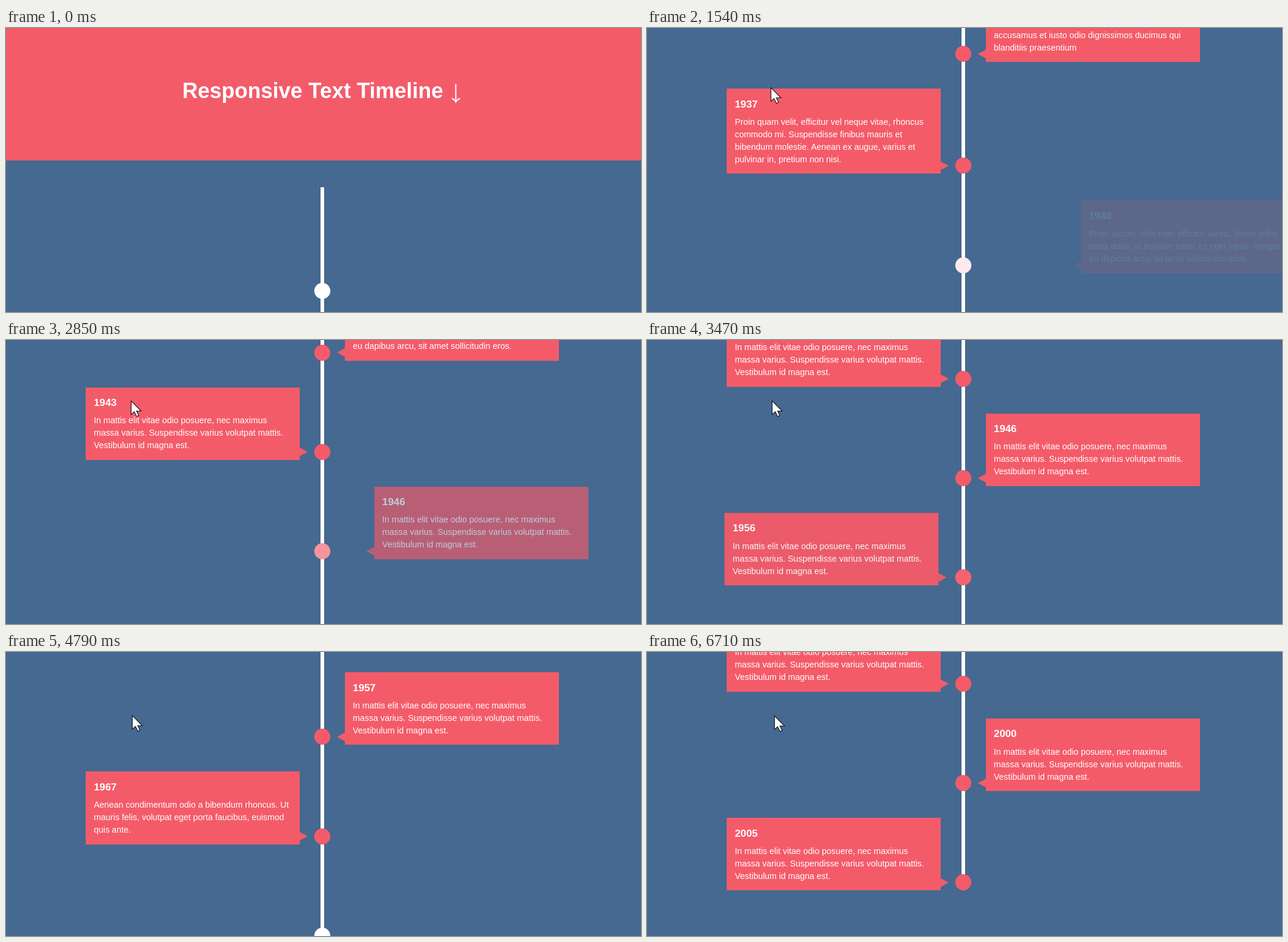
Write an HTML page that moves like this. It is 1068 px wide and 478 px high and loops after 7.09 s.

```html
<!DOCTYPE html>
<html lang="en">
<head>
<meta charset="utf-8">
<title>Responsive Text Timeline</title>
<style>
  html, body { margin: 0; width: 100%; height: 100%; overflow: hidden; background: #456990; }
  svg { display: block; width: 1068px; height: 478px; }
  text { font: 14.4px Arial, "Liberation Sans", sans-serif; fill: #fff; white-space: pre; }
  .year { font-size: 17.28px; font-weight: bold; }
  .heading { font-size: 36px; font-weight: bold; }
</style>
</head>
<body>
<svg viewBox="0 0 1068 478">
  <rect width="1068" height="478" fill="#456990"/>
  <g id="page">
    <rect width="1068" height="223" fill="#f45b69"/>
    <text class="heading" x="296.5" y="118">Responsive Text Timeline</text>
    <path d="M756.5 94V124.5M750 118.5Q754.5 120.5 756.5 124.5Q758.5 120.5 763.5 118.5" fill="none" stroke="#fff" stroke-width="2"/>
    <rect id="line" x="529" y="268" width="6" fill="#fff"/>
  </g>
  <g id="cursor">
    <path id="arrow" d="M.5 .5V23.5L5.7 18.6L9.7 26.8L13.3 25.2L9.6 17.5H17.3Z" fill="#fff" stroke="#111" stroke-width="1.1"/>
    <path id="beam" d="M-6-12H-1M2-12H7M-6 11H-1M2 11H7M.5-11V10" fill="none" stroke="#c49a6c" stroke-width="2"/>
  </g>
</svg>
<script>
const LOOP = 7090, STEP = 77.1;
const SLIDE = 500, PAINT_LAG = 30;

const mattis = ['In mattis elit vitae odio posuere, nec maximus',
  'massa varius. Suspendisse varius volutpat mattis.', 'Vestibulum id magna est.'];

// year, time at which the card starts to slide in, lines
const entries = [
  [1934, 50, ['Lorem ipsum dolor sit amet, consectetur', 'adipiscing elit sed diam. At vero eos et',
    'accusamus et iusto odio dignissimos ducimus qui', 'blanditiis praesentium']],
  [1937, 665, ['Proin quam velit, efficitur vel neque vitae, rhoncus', 'commodo mi. Suspendisse finibus mauris et',
    'bibendum molestie. Aenean ex augue, varius et', 'pulvinar in, pretium non nisi.']],
  [1940, 1387, ['Proin iaculis, nibh eget efficitur varius, libero tellus',
    'porta dolor, at pulvinar tortor ex eget ligula. Integer', 'eu dapibus arcu, sit amet sollicitudin eros.']],
  [1943, 1723, mattis],
  [1946, 2525, mattis],
  [1956, 3018, mattis],
  [1957, 3765, mattis],
  [1967, 4015, ['Aenean condimentum odio a bibendum rhoncus. Ut',
    'mauris felis, volutpat eget porta faucibus, euismod', 'quis ante.']],
  [1977, 4795, ['Vestibulum porttitor lorem sed pharetra dignissim.',
    'Nulla maximus, dui a tristique iaculis, quam dolor', 'convallis enim, non dignissim ligula ipsum a turpis.']],
  [1985, 5190, mattis],
  [2000, 5486, mattis],
  [2005, 6185, mattis]
];

// wheel ticks: start, end, scroll position reached
const ticks = [
  [30, 230, 100], [580, 790, 200], [1325, 1555, 400], [1580, 1760, 500],
  [2162, 2362, 600], [2405, 2605, 700], [2720, 2920, 800], [2934, 3134, 900],
  [3560, 3740, 1000], [3740, 3893, 1100], [3893, 4093, 1200], [4100, 4300, 1300],
  [4711, 4911, 1400], [4930, 5110, 1500], [5150, 5330, 1600], [5367, 5567, 1700],
  [6040, 6290, 1915]
];

// pointer moves: time, x, y
const moves = [[0, 208, 100], [1700, 210, 102], [4000, 212, 106.5], [6020, 214, 107]];
const beamTimes = [[1700, 2380], [5060, 5260]];

const $ = id => document.getElementById(id);
const clamp = x => Math.min(1, Math.max(0, x));

function add(parent, tag, attrs, text) {
  const node = document.createElementNS('http://www.w3.org/2000/svg', tag);
  for (const key in attrs) node.setAttribute(key, attrs[key]);
  if (text !== undefined) node.textContent = text;
  return parent.appendChild(node);
}

// cubic-bezier(.42, 0, .58, 1)
function easeInOut(x) {
  let lo = 0, hi = 1, u = x;
  for (let i = 0; i < 24; i++) {
    u = (lo + hi) / 2;
    const at = 1.26 * u * (1 - u) ** 2 + 1.74 * u * u * (1 - u) + u ** 3;
    if (at < x) lo = u; else hi = u;
  }
  return x <= 0 ? 0 : x >= 1 ? 1 : u * u * (3 - 2 * u);
}

const easeQuad = x => x < .5 ? 2 * x * x : 1 - 2 * (1 - x) ** 2;

function scrollAt(t) {
  let pos = 0;
  for (const [start, end, target] of ticks) {
    if (t <= start) break;
    pos += (target - pos) * easeQuad(clamp((t - start) / (end - start)));
  }
  return Math.round(pos);
}

let y = 268;
const items = entries.map(([year, start, lines], i) => {
  const right = i % 2 === 0;
  const top = y + 45, bottom = top + 59.2 + 21 * lines.length;
  const boxTop = Math.round(top), boxBottom = Math.round(bottom);
  const x = right ? 570 : 134, textX = right ? 583.3 : 147.7;
  const baseline = offset => Math.floor(top - .05 + offset);
  const card = add($('page'), 'g', {});
  add(card, 'rect', { x, y: boxTop, width: 360, height: boxBottom - boxTop, fill: '#f45b69' });
  const [base, tip] = right ? [570, 556.5] : [494, 507.5];
  add(card, 'path', { d: `M${base} ${bottom - 20.7}L${tip} ${bottom - 13.5}L${base} ${bottom - 6.3}Z`, fill: '#f45b69' });
  add(card, 'text', { class: 'year', x: textX, y: baseline(32) }, year);
  lines.forEach((line, n) => add(card, 'text', { x: textX, y: baseline(61.2) + 21 * n }, line));
  y = bottom;
  return { start, card, side: right ? 1 : -1, bottom: boxBottom };
});
$('line').setAttribute('height', Math.round(y) - 268);
for (const item of items) item.dot = add($('page'), 'circle', { cx: 532, cy: item.bottom - 13.5, r: 13.5 });

function draw(t) {
  $('page').setAttribute('transform', `translate(0 ${-scrollAt(t)})`);
  for (const { start, card, side, dot } of items) {
    const slide = easeInOut(clamp((t - start) / SLIDE));
    const fade = easeInOut(clamp((t - start - PAINT_LAG) / SLIDE));
    card.setAttribute('transform', `translate(${side * 200 * (1 - slide)} 0)`);
    card.setAttribute('opacity', fade);
    card.setAttribute('visibility', fade > 0 ? 'visible' : 'hidden');
    const mix = to => Math.round(255 + (to - 255) * fade);
    dot.setAttribute('fill', `rgb(${mix(244)},${mix(91)},${mix(105)})`);
  }
  const [, cx, cy] = moves.filter(m => m[0] <= t).pop();
  const beam = beamTimes.some(([a, b]) => t >= a && t < b);
  $('cursor').setAttribute('transform', `translate(${cx} ${cy})`);
  $('cursor').setAttribute('visibility', t > 0 ? 'visible' : 'hidden');
  $('arrow').setAttribute('display', beam ? 'none' : 'inline');
  $('beam').setAttribute('display', beam ? 'inline' : 'none');
}

// The picture advances about 13 times per second.
const origin = performance.now();
function tick() {
  const t = (performance.now() - origin) % LOOP;
  draw(Math.floor((t + 8) / STEP) * STEP);
  requestAnimationFrame(tick);
}
draw(0);
requestAnimationFrame(tick);
</script>
</body>
</html>
```
